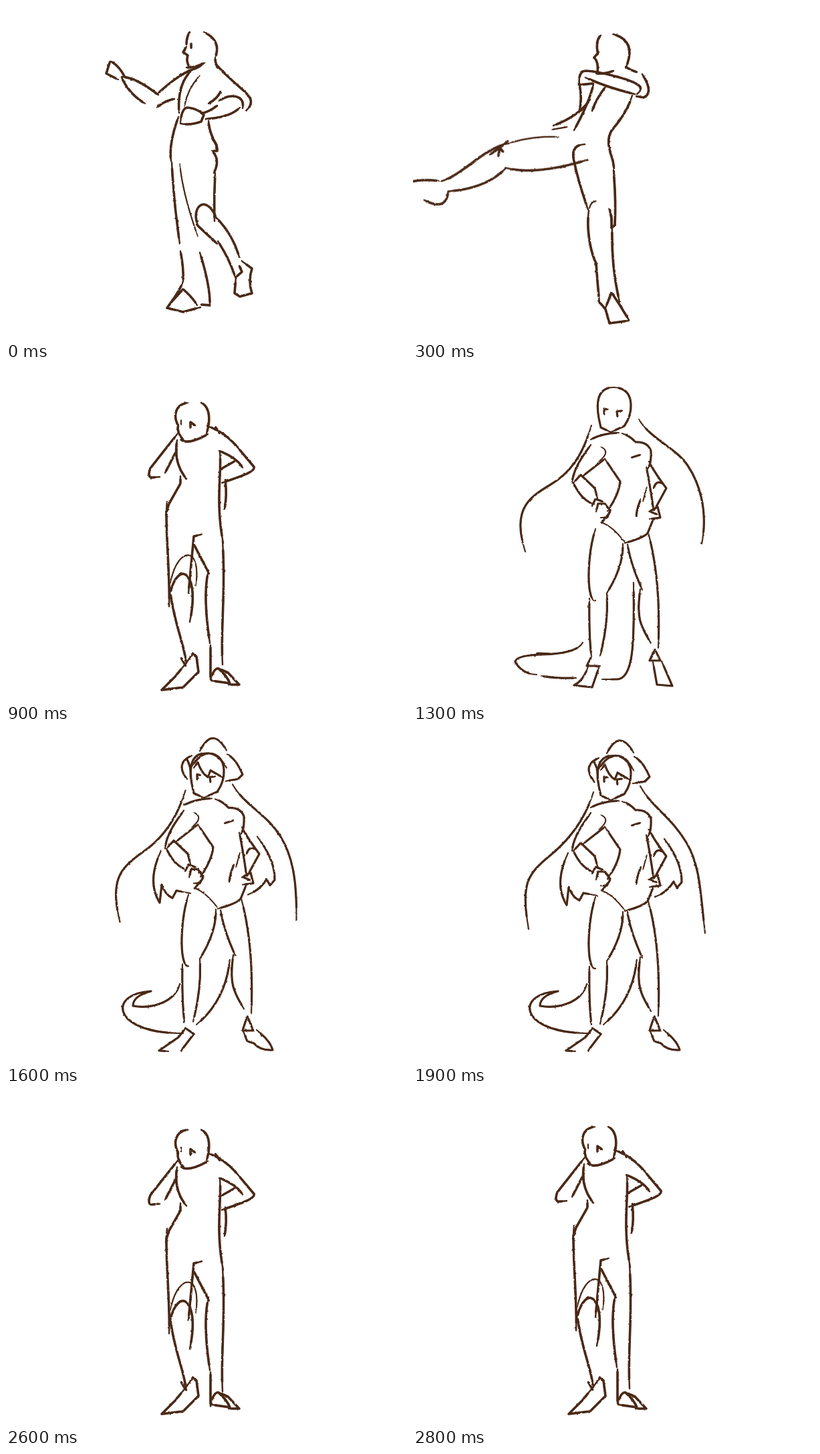
These frames come from a looping animation (600x500 px, 2.9 s). An HTML page:

```html
<!DOCTYPE html>
<html lang="en">
<head>
<meta charset="utf-8">
<title>Kick and pose sketch</title>
<style>
html, body { margin: 0; width: 100%; height: 100%; overflow: hidden; background: #fff; }
svg { display: block; width: 100%; height: 100%; }
path { fill: none; stroke: #4a2917; stroke-linecap: round; stroke-linejoin: round; }
</style>
</head>
<body>
<svg viewBox="0 0 600 500">
  <filter id="rough" filterUnits="userSpaceOnUse" x="0" y="0" width="600" height="500" color-interpolation-filters="sRGB">
    <feTurbulence type="fractalNoise" baseFrequency=".2" numOctaves="2" seed="4"/>
    <feDisplacementMap in="SourceGraphic" scale="2.2" xChannelSelector="R" yChannelSelector="G"/>
  </filter>
  <g id="ink" filter="url(#rough)"></g>
</svg>
<script>
// Brush strokes by part; a leading ~ marks a light stroke.
const punch = {
  body: `
    M296 39Q323 52 313 77 M275 39Q270 46 270 58 M270 61L265 69L272 74Q269 82 274 91
    M270 92Q282 93 297 85 M277 56V63 M313 79Q313 86 317 93
    M313 85Q320 96 357 128C366 137 372 145 359 157
    M156 82L150 101L168 110 M157 83Q170 90 178 107
    M173 107Q184 132 208 146 M173 106Q193 106 228 133 M226 132Q260 101 278 96
    M226 152Q235 143 252 139 M272 97Q284 95 293 88
    M276 98Q256 119 259 160 ~M290 104Q271 125 267 151
    M261 174Q263 152 272 152Q288 154 296 163L292 173Q276 179 261 176
    M292 161Q305 158 316 149 M318 142C338 129 358 135 354 153
    M299 169Q335 167 350 152 M321 128Q317 138 303 146
    M258 166Q243 207 247 232 M248 234Q251 295 260 356 M261 367Q266 392 265 412
    M303 172Q304 190 315 208V217 M308 198Q317 208 316 217H309 M309 218Q321 230 311 250
    M313 250Q311 285 312 322 ~M260 236Q264 280 287 345 M290 369Q306 420 305 449`,
  leg: `
    M287 328C276 300 300 280 315 318 M315 317Q340 343 349 376 M285 327L316 356
    M317 352Q335 380 343 406 M353 382L368 393Q362 412 368 430L350 435L342 430L344 406
    M345 405L353 398L349 389`,
  ground: `
    M265 412Q261 425 241 452L265 458L291 451 M243 448L265 424Q279 436 286 448 M292 447L305 448`,
  hip: "300 310", width: 3.8
};

const kick = {
  body: `
    M299 42Q335 52 319 91 M281 44Q272 52 277 73 M278 69L271 77Q278 84 276 100
    M274 101Q288 102 300 97 M318 91Q325 96 335 99
    M249 117Q247 97 259 97C280 98 325 110 335 117Q346 123 335 132 M258 107Q290 122 332 132
    M249 118L270 116 M343 102Q361 130 345 137L334 135
    M270 117Q264 144 241 186 M288 121Q274 139 268 157 M249 118Q254 140 248 160
    M265 140Q248 165 210 179 ~M208 185L231 181
    M328 134Q321 158 300 183Q287 197 297 225Q301 236 301 251
    M300 246Q304 290 302 328L297 332Q298 315 295 305
    M257 207Q235 208 241 232Q247 262 262 305 ~M264 303Q266 293 274 292
    M263 306C259 335 266 370 274 385Q276 415 279 445
    ~M293 302Q297 318 297 330 M298 330C297 370 300 405 309 443`,
  leg: `
    M165 143C130 124 85 136 52 122 ~M165 143Q200 157 229 184 M133 138Q150 140 167 140
    M141 148L151 140V148 M14 92Q34 102 49 119 M14 127Q28 162 50 140
    M138 169Q95 173 50 140 M240 238C200 221 160 199 138 168`,
  ground: `M277 441L288 454L294 475L323 471 M288 452L297 429L309 447L323 470`,
  hip: "240 205", width: 3.9
};

const rest = {
  body: `
    M272 52C252 54 250 74 258 87 M292 52C306 58 306 80 300 98 M258 85Q254 94 266 109
    M262 108Q274 115 302 99 M276 90V81L283 86 ~M262 78V85
    M304 88Q326 95 347 119 M313 88L320 98 M345 117L371 148C374 156 345 164 323 172
    M319 124Q346 135 354 149 M322 151L343 139
    M257 98Q226 137 216 150Q211 163 218 164L230 163 M256 122L238 157
    M256 108Q250 142 270 166 M261 162V173L244 203Q241 212 239 220
    M241 200C237 230 246 310 244 357 M320 125C323 160 313 200 325 262
    M328 168Q331 190 327 211 M324 258C329 340 321 380 324 444
    M293 249L281 252L273 337 M280 262L304 308 M303 303C294 340 302 390 305 412 M306 415V466
    ~M246 322C256 267 293 264 284 326 M244 345C254 285 292 300 275 380
    M245 330C252 385 263 400 270 442`,
  ground: `
    M270 441L280 427L285 432L288 455L265 478L233 482L254 461Z M262 434L269 446
    M306 466Q312 448 318 450Q330 460 335 472L307 468 M319 450L332 456L349 474H333`,
  width: 3.8
};

const proud = `
  M300 29C273 29 275 58 278 75L281 89L296 96 M300 29C332 29 331 66 316 87L296 96
  M291 62L286 61V69 M313 64L305 65L306 73
  M266 107Q285 97 308 97 M313 98Q324 101 333 111Q351 110 356 124Q357 145 350 152
  M266 115C254 132 240 150 238 172 ~M281 118Q297 125 278 140 M287 136L255 161
  M287 136L310 170Q308 190 291 214 M240 172L251 160L272 180L276 195 M240 172Q251 196 268 203
  M268 206L273 196L284 200 M274 215L277 203H287L295 214L290 224H281 M282 232L295 216
  M327 134L340 130 M349 148Q353 165 360 213 M353 140Q361 156 379 180L361 213
  M360 180Q364 167 373 173 M353 215L366 208L370 224L354 226 M355 215L365 219
  M341 196Q335 210 334 222 ~M350 178L344 200
  ~M281 231Q298 236 317 261 M317 262Q350 253 352 245L360 225
  M273 241C262 275 262 315 264 330Q267 350 273 348 M314 263Q315 297 290 337
  M321 264Q325 292 343 332 M352 247C364 290 370 350 367 419
  M264 345Q263 400 267 432 M290 337Q293 380 280 431 M340 331C334 375 340 385 356 412`;

const costume = `
  M290 26Q309 -12 330 25 M278 33Q252 44 271 68 M270 37Q278 50 276 67
  M331 31Q344 37 354 61L347 68L329 71 M278 49Q304 9 330 51
  M281 51L287 43Q293 60 302 65L306 55L325 66
  M232 175Q210 222 230 253L233 226Q238 241 249 246L255 235L276 239
  M376 154Q403 190 402 219L395 227L390 218Q379 235 362 241`;

const heels = `
  M267 432L260 446H280 M262 447Q255 468 241 475L268 478L279 446
  M362 421L354 438H370Z M359 440L365 474L388 476L372 439`;
const shoes = `
  M269 446L258 460L229 480L243 481 M262 480L281 455L268 446
  M361 428L354 450H370Z M355 451L361 466L371 469Q380 480 399 479Q396 466 375 449`;

// Same commands in each, so that they blend.
const hair = [
  "M267 86C258 115 245 152 205 175C172 195 148 212 168 275 M338 77C357 108 392 118 411 146C434 180 440 225 432 263",
  "M270 84C259 120 238 152 205 179C168 209 162 225 173 289 M340 75C358 108 386 120 410 161C430 196 430 235 437 295",
  "M267 87C258 115 240 152 205 175C172 195 161 190 161 240 M337 76C357 108 395 118 415 145C434 175 441 200 438 240"
];

const tails = [
  `M254 411Q245 428 190 429C168 430 153 433 153 440Q163 458 185 459 M185 427L206 428
   M192 461Q215 465 244 464 M330 321C331 400 332 466 305 466H283`,
  `M260 380C255 405 220 419 190 413Q190 398 217 391C150 395 160 455 265 454 M335 343Q329 405 285 441`,
  `M361 280C362 360 382 360 395 380C414 420 408 454 390 455 M299 320Q307 372 355 416
   M278 449C310 443 355 455 365 434 M280 456C310 450 335 463 354 457`
];

// Eased value between [frame, value] keys.
function track(f, keys) {
  const i = keys.findIndex(k => k[0] > f);
  if (i < 0) return keys[keys.length - 1][1];
  if (!i) return keys[0][1];
  const [f0, a] = keys[i - 1], [f1, b] = keys[i], t = (f - f0) / (f1 - f0);
  return a + (b - a) * t * t * (3 - 2 * t);
}

const legTurn = [[0, 0], [2, -55], [3, -40], [4, 26], [5, 0], [6, -1], [7, -30]];
const bob = [[7, 0], [8, -6], [9, 0], [11, 10], [12, -18], [13, 0], [15, 9], [17, 2], [19, 9], [21, 2], [23, 0], [24, 9], [28, 0]];
const sway = [[13, 0], [19, 1], [23, 2], [24, 2.2]];

function blend(a, b, t) {
  const to = b.match(/\d+/g);
  let i = 0;
  return a.replace(/\d+/g, n => (+n + (to[i++] - n) * t).toFixed(1));
}

function proudPose(f) {
  const s = track(f, sway), dressed = f > 13 && f < 23;
  const from = s < 1 ? 0 : 1;
  return {
    body: proud + blend(hair[from], hair[from + 1], s - from) + (dressed ? costume : ""),
    ground: tails[dressed ? 1 : f < 14 ? 0 : 2] + (dressed ? shoes : heels),
    width: 3.4
  };
}

function poseAt(f) {
  if (f < 3) return punch;
  if (f < 8) return kick;
  return f > 10 && f < 25 ? proudPose(f) : rest;
}

// Each stroke is thin along its length and thicker away from its ends.
function brush(strokes = "", width) {
  return strokes.match(/~?M[^M~]+/g)?.map(s => {
    const w = s[0] === "~" ? width * 0.6 : width, d = s.replace("~", "");
    return `<path d="${d}" stroke-width="${w * 0.65}"/>
      <path d="${d}" stroke-width="${w * 0.95}" pathLength="100" stroke-dasharray="84 200" stroke-dashoffset="-8"/>`;
  }).join("") ?? "";
}

const layer = document.getElementById("ink");
let shown = -1;

function draw(ms) {
  const f = Math.floor(ms % 2900 / 100);
  if (f === shown) return;
  shown = f;
  const { body, leg, ground, hip = "0 0", width } = poseAt(f);
  layer.innerHTML = `
    <g transform="translate(0 ${track(f, bob)})">${brush(body, width)}</g>
    <g transform="rotate(${track(f, legTurn)} ${hip})">${brush(leg, width)}</g>
    ${brush(ground, width)}`;
}

const start = performance.now();
function tick() {
  draw(performance.now() - start);
  requestAnimationFrame(tick);
}
tick();
</script>
</body>
</html>
```
